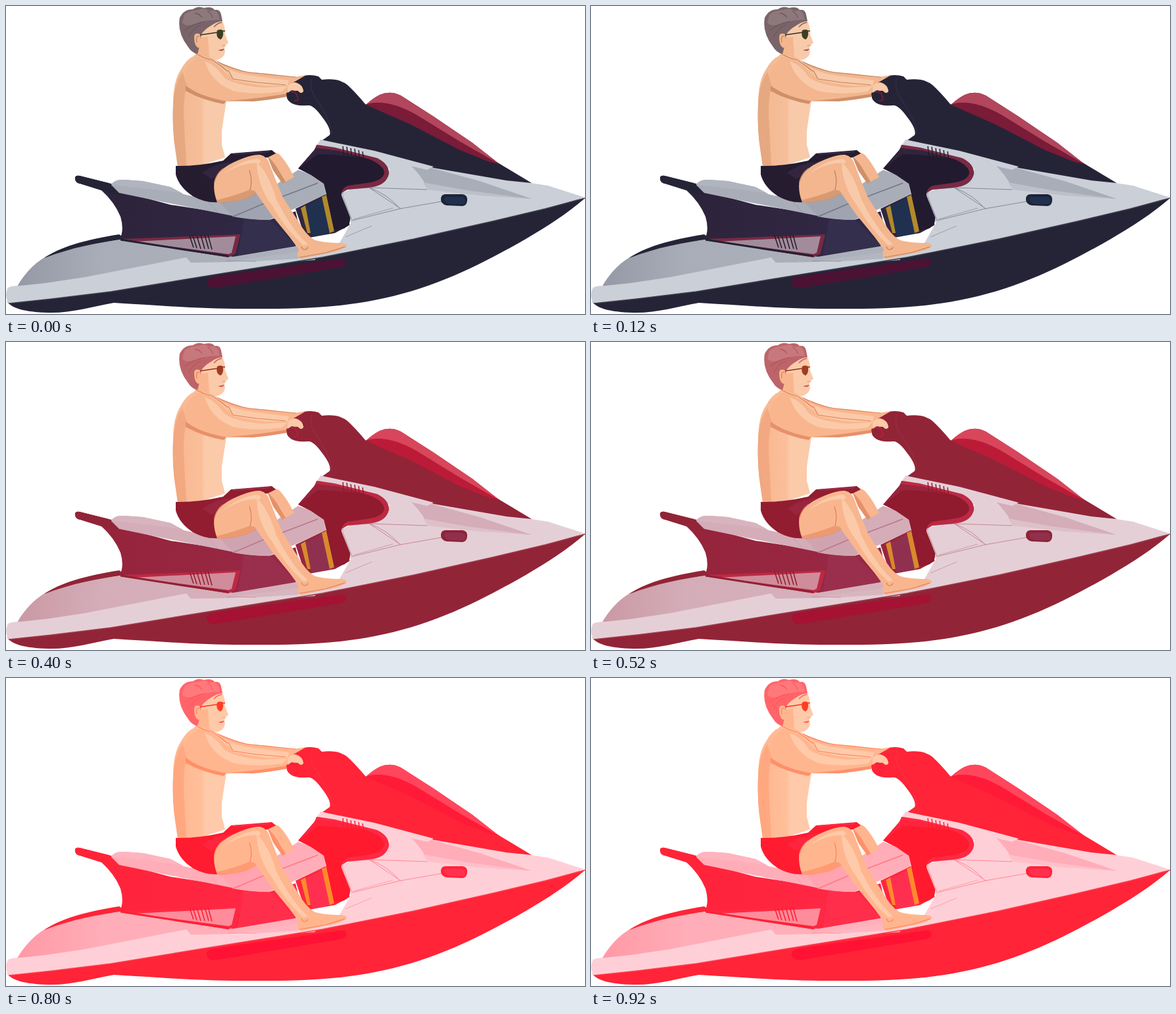
Recreate the animation shown at these times as an HTML page. Size 880x468 px, loop 1 s.

```html
<!DOCTYPE html>
<html lang="en">
<head>
<meta charset="utf-8">
<title>Jet ski</title>
<style>
  html, body { margin: 0; width: 100%; height: 100%; overflow: hidden; background: #fff; }
  .stage { position: relative; width: 880px; height: 468px; background: #fff; isolation: isolate; }
  svg { display: block; }

  /* Screening with red lifts only the red channel; white stays white. */
  .flush {
    position: absolute; inset: 0; background: #f00; mix-blend-mode: screen;
    animation: flush 1s steps(5, jump-none) infinite;
  }
  @keyframes flush { from { opacity: 0; } to { opacity: 1; } }

  .navy { fill: #252437; }
  .plum { fill: #302640; }
  .ink { fill: #221a2e; }
  .light { fill: #cbcfd7; }
  .grey { fill: #a9adb8; }
  .wine { fill: #7a1b38; }
  .gold { fill: #b18a2c; }
  .skin { fill: #f3b68e; }
  .pale { fill: #f8caa9; }
  .tan { fill: #cf9069; }
  .line { fill: none; stroke: #858995; stroke-width: 1; }
  .fold { fill: none; stroke: #bd805c; stroke-width: 1.2; stroke-linecap: round; }
  .slit { fill: none; stroke: #211c2c; stroke-width: 1.5; }
</style>
</head>
<body>
<div class="stage">
<svg width="880" height="468" viewBox="0 0 880 468">
  <defs>
    <linearGradient id="rear">
      <stop offset="0" stop-color="#9599a5"/>
      <stop offset=".28" stop-color="#a9adb8"/>
      <stop offset="1" stop-color="#adb1bb"/>
    </linearGradient>
    <linearGradient id="chest">
      <stop offset="0" stop-color="#f3b68e"/>
      <stop offset=".5" stop-color="#f5bf9a"/>
      <stop offset=".56" stop-color="#f8caa9"/>
      <stop offset="1" stop-color="#f8caa9"/>
    </linearGradient>
    <linearGradient id="side">
      <stop offset="0" stop-color="#2c2339"/>
      <stop offset=".6" stop-color="#302641"/>
      <stop offset="1" stop-color="#30294a"/>
    </linearGradient>
  </defs>

  <g id="hull">
    <path class="navy" d="M2 449C8 459 28 465 64 466C98 467 130 457 164 451C235 455 300 461 380 460C440 460 500 459 560 447C650 430 720 394 790 354C824 334 852 316 880 292L700 320L300 405Z"/>
    <path fill="#4c1233" d="M305 418Q306 412 322 410L500 385Q517 381 517 388Q518 395 508 397L322 428Q305 431 305 418Z"/>
  </g>

  <g id="deck">
    <path fill="url(#rear)" d="M17 426C26 410 40 393 60 381C95 367 135 359 178 355L345 376L470 360L470 386L280 400Z"/>
    <path class="light" d="M3 428Q8 425 22 425L60 421L120 412L274 382L281 390L340 389L430 384L500 372L524 330L510 284L540 272L575 268L583 248L560 231L474 213L478 203L560 220L650 244L798 269L824 273L880 291L820 308L740 327L620 354L480 382L300 411L160 434L70 445L4 452Q-3 440 3 428Z"/>
    <path d="M4 452L70 445L160 434L300 411L480 382L620 354L740 327L820 308L880 292" fill="none" stroke="#3d3c4c" stroke-width="1.4"/>
    <path class="grey" d="M612 239L650 247L720 266L799 293L720 287L641 278Q632 258 612 239Z"/>
    <path d="M641 279L720 288L799 293L700 280L634 268Z" fill="#bcc0ca"/>
    <path d="M336 388L445 374L444 384L380 388Z" fill="#b2b6c0"/>
    <path class="line" d="M511 287Q512 279 522 278L552 276L640 279M552 276Q580 286 599 308L526 326L511 287M599 308L662 297M552 276L600 308"/>
    <path class="line" d="M528 324L588 307M516 351L556 334M450 371L480 365M336 387L380 388" opacity=".7"/>
    <path d="M668 286H694Q701 287 701 294Q701 303 694 304L670 303Q660 301 661 292Q662 286 668 286Z" fill="#1e2338"/>
    <path d="M669 290H693Q698 291 698 297L697 301L674 301Q665 298 666 292Z" fill="#20304f"/>
  </g>

  <g id="tail">
    <path class="navy" d="M58 383C80 367 120 355 172 347L182 354C140 359 100 367 58 383Z"/>
    <path fill="url(#side)" d="M105 263Q104 257 112 258L160 270L172 281L250 302L400 325L440 312L448 345L440 365L345 381L270 369L173 354Q180 340 174 320Q165 298 145 280L113 270Q106 269 105 263Z"/>
    <path class="navy" d="M105 263Q104 257 112 258L156 269Q170 275 173 287L160 285L145 280L113 270Q106 269 105 263Z"/>
    <path d="M362 321L402 325L420 343L440 364L352 379Z" fill="#342f4c"/>
    <path d="M175 354L230 352L356 347L349 376L338 382L270 371Z" fill="#792943"/>
    <path d="M194 358L349 350L343 375L338 377L278 369Z" fill="#a28c9b"/>
    <path d="M174 355L270 370L338 380" fill="none" stroke="#242034" stroke-width="3"/>
    <path class="slit" d="M279 349l6 18m-1 -18l6 19m0 -19l6 20m0 -21l6 21m0 -21l6 21m-1 -21l6 22"/>
  </g>

  <g id="seat">
    <path class="grey" d="M160 272Q164 263 180 264L208 266L250 275L270 286L320 297L400 278L444 249L466 257L483 270L486 286L445 305L400 325Q370 325 330 316L230 296L172 284Z"/>
    <path d="M160 272Q164 263 180 264L208 266L250 275L267 284L210 277Z" fill="#b0b4be"/>
    <path d="M325 298L380 285L407 319L400 325Q370 325 345 320Z" fill="#a0a4b0"/>
    <path d="M345 320L390 301L474 269" fill="none" stroke="#747784" stroke-width="1.6"/>
    <path d="M305 295L322 314" class="line" opacity=".5"/>
  </g>

  <g id="well">
    <path class="plum" d="M440 308L486 286L522 320L522 333L500 345L455 353Z"/>
    <path d="M455 305L482 291L493 345L465 351Z" fill="#20304f"/>
    <path class="gold" d="M448 307L455 303L463 345L458 345ZM480 290L487 287L499 342L492 345Z"/>
    <path fill="#792943" d="M472 211Q482 209 500 214L560 229Q583 239 582 255Q578 274 550 276L519 279L510 284L505 250L468 220Z"/>
    <path class="ink" d="M444 247L471 216L505 220L553 233Q575 243 575 254Q572 266 548 269L519 273Q509 278 510 288L523 321Q524 333 514 338L499 342L487 287L483 270L464 257Z"/>
    <path d="M444 247L471 216L505 220L540 231Q510 226 474 225Z" fill="#31243d"/>
  </g>

  <g id="console">
    <path class="navy" d="M425 131Q430 119 444 109Q459 102 475 107L480 112Q506 109 519 120Q532 132 546 149L610 171L749 239L799 269L760 265L650 246L560 222L480 204L471 211L492 196Q495 187 480 168Q467 150 459 151Q435 153 428 142Z"/>
    <path d="M478 203L560 220L650 244L640 249L560 230L500 215L474 211Z" class="light"/>
    <path d="M465 110Q459 125 474 145Q493 174 495 194" fill="none" stroke="#2e2b40" stroke-width="2"/>
    <path class="wine" d="M547 150Q558 140 568 135Q584 128 600 136L650 168L709 208L750 240L735 237L690 219L615 180Z"/>
    <path d="M548 149Q558 140 568 135Q584 128 600 136L650 168L709 208L748 239L690 206L625 166Q580 140 548 149Z" fill="#b2465c"/>
    <path class="slit" d="M512 213l2 19m4 -18l2 19m4 -17l2 18m4 -17l2 18m4 -16l2 17m4 -15l2 16"/>
  </g>

  <g id="far-limbs">
    <path class="skin" d="M318 83Q345 94 365 100L400 103L437 108L456 105L444 112L428 121L390 121L348 116Z"/>
    <path d="M330 92Q350 103 375 106L430 113L428 121L390 121L348 116Z" class="pale"/>
    <path class="fold" d="M320 84Q345 97 370 101L440 108M338 98L345 111L380 116L425 120"/>
    <path class="skin" d="M396 226Q405 218 416 226Q428 239 438 260L421 269L407 249Z"/>
    <path class="tan" d="M397 228Q408 237 417 254L425 267L420 270L406 250Z"/>
  </g>

  <g id="torso">
    <path fill="url(#chest)" d="M290 71L317 79L328 93L341 112L335 145Q330 175 328 190L328 211L333 230L300 241L261 244L258 223Q252 188 254 150Q254 115 265 98Q274 81 285 76Z"/>
    <path d="M275 120Q268 142 271 185L274 242L261 244L258 223Q252 188 254 150Q255 122 268 100Z" fill="#dfa079" opacity=".65"/>
    <path class="tan" d="M273 121Q296 137 335 144L331 149Q298 143 273 129Z"/>
    <path class="skin" d="M290 77Q310 78 322 90L347 113Q370 118 395 121L428 121Q433 116 440 116Q450 118 452 130Q448 135 443 128L435 130L426 138Q400 142 376 144L338 145Q300 139 279 125Q266 113 276 92Z"/>
    <path class="pale" d="M302 84Q317 88 331 108Q345 120 390 124L428 122L420 130Q380 136 345 129Q312 116 302 84Z"/>
    <path class="tan" d="M335 144Q375 142 428 133L426 138Q400 143 376 145Z"/>
    <path class="fold" d="M290 73Q300 79 314 82L337 99"/>
  </g>

  <g id="grip">
    <path class="navy" d="M426 133Q431 126 440 129Q446 134 443 146Q431 147 427 140Z"/>
    <path d="M432 130Q443 129 444 143L438 144" fill="none" stroke="#701e3b" stroke-width="2"/>
    <path class="pale" d="M428 122Q435 115 441 117Q451 120 452 129Q449 134 445 129L434 128L428 132Z"/>
  </g>

  <g id="head">
    <path class="pale" d="M293 38L312 24L328 21Q333 29 333 43L338 56L333 60L332 65L333 69Q332 79 321 82L313 80L304 78L290 71Z"/>
    <path class="skin" d="M294 48L307 47L309 77L318 82L290 73Z"/>
    <path fill="#796469" d="M291 73Q282 71 276 61Q260 40 264 18Q270 5 284 5Q292 -1 301 3Q313 0 317 6Q325 4 327 13L329 23Q320 24 313 29Q301 36 297 43L294 62Z"/>
    <path fill="#8d787c" d="M271 13Q280 6 292 6Q302 1 309 8Q319 4 323 13L325 21Q306 20 286 28Q272 32 268 25Z"/>
    <path d="M272 37Q286 26 302 24M278 47Q284 33 296 29M287 11Q294 11 298 18M306 8Q312 10 314 18" fill="none" stroke="#6b575d" stroke-width="1.3"/>
    <path class="skin" d="M295 43Q286 39 286 48Q286 61 293 64L297 58Z"/>
    <path class="fold" d="M294 46Q288 45 290 55"/>
    <path d="M295 44L322 40M326 38L333 38" fill="none" stroke="#34301f" stroke-width="1.6"/>
    <path d="M321 37Q328 34 330 38Q331 48 326 51Q318 48 321 37Z" fill="#3b3e25"/>
    <path d="M316 32Q321 26 328 25" fill="none" stroke="#84655f" stroke-width="1.3"/>
    <path d="M322 67L332 65Q330 70 322 67Z" fill="#9c5551"/>
    <path class="fold" d="M334 60L329 60" opacity=".7"/>
  </g>

  <g id="shorts">
    <path fill="#251c30" d="M258 243Q290 244 330 235L342 224L404 219L410 224L398 230L375 234L339 255L321 271L323 298Q304 300 284 289Q263 275 258 256Z"/>
    <path fill="#34253f" d="M298 253Q320 238 344 237L365 229L342 247L312 263Z"/>
    <path d="M345 225L382 223L400 221" fill="none" stroke="#3c2b46" stroke-width="2"/>
  </g>

  <g id="leg">
    <path class="skin" d="M317 264Q324 248 345 238Q372 225 386 226Q397 228 401 241Q410 265 421 291L443 325Q455 347 468 355Q481 360 509 360Q520 361 517 366Q505 374 486 376L451 384Q443 384 443 376L445 370L431 351L404 318L380 284L365 292Q340 299 321 298Q314 281 317 264Z"/>
    <path class="tan" d="M320 295Q346 289 371 279L378 281L381 285L365 293Q340 300 322 299Z" opacity=".75"/>
    <path class="pale" d="M329 257Q355 234 383 232Q390 236 385 239Q357 237 329 257ZM381 237Q399 254 411 294Q434 340 459 362L452 364Q423 337 405 304Q382 275 381 237Z"/>
    <path class="fold" d="M371 279Q375 265 370 250M317 267Q320 254 330 247M449 366Q453 374 459 367M446 382L486 375L515 366"/>
  </g>
</svg>
<div class="flush"></div>
</div>
</body>
</html>
```
